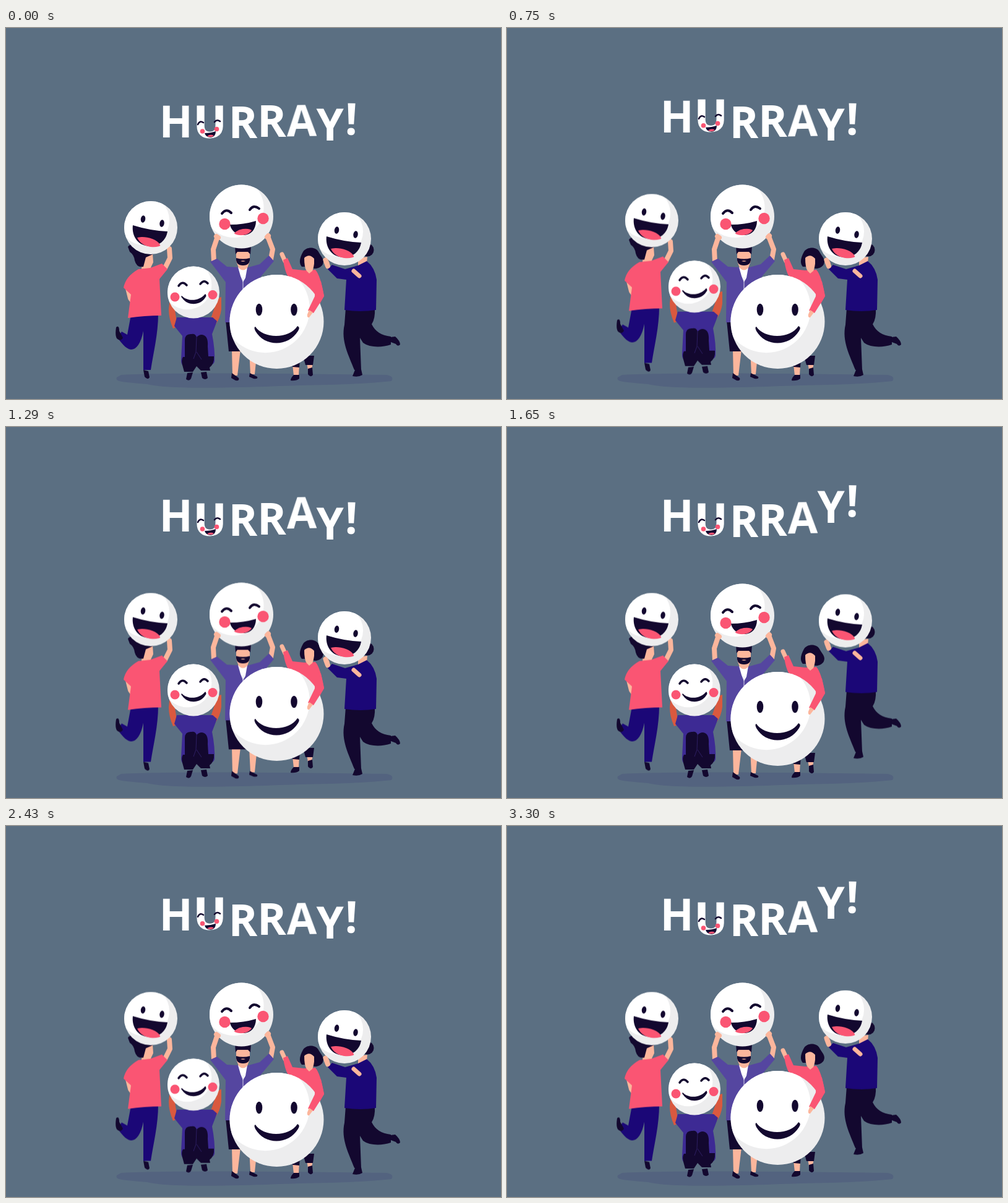
Animation of 800 by 600 pixels, one loop 3.33 s. Source, as an HTML page without scripts:

```html
<!DOCTYPE html>
<html lang="en">
<head>
<meta charset="utf-8">
<title>Hurray!</title>
<style>
html, body { margin: 0; width: 100%; height: 100%; overflow: hidden; background: #5b6f82; }
svg { display: block; width: 800px; height: 600px; }
text { font: 700 71px "Open Sans", "Noto Sans", sans-serif; fill: #fff; }

.ink { fill: #13082f; }
.skin { fill: #fcb69c; }
.pink { fill: #fa5573; }
.navy { fill: #1b0777; }
.violet { fill: #5546a0; }
.indigo { fill: #3d2a94; }
.tan { fill: #d9593f; }
.limb { fill: none; stroke: #fcb69c; stroke-width: 8; stroke-linecap: round; stroke-linejoin: round; }
.brow { fill: none; stroke: #13082f; stroke-width: 4; stroke-linecap: round; }

/* The wave runs every 1680 ms; the second run is cut short at 3330 ms. */
.j1, .j2, .j3, .j4, .j5 { animation: 3330ms linear infinite; }
.j1 { animation-name: jump1; }
.j2 { animation-name: jump2; }
.j3 { animation-name: jump3; }
.j4 { animation-name: jump4; }
.j5 { animation-name: jump5; }
@keyframes jump1 {
  0%, 3.6%, 50.45%, 54.05% { transform: translateY(0); }
  9.37%, 59.82% { transform: translateY(-29px); }
  13.21%, 50.44%, 63.66%, 100% { transform: translateY(var(--end)); }
}
@keyframes jump2 {
  0%, 14.92%, 50.45%, 65.37% { transform: translateY(0); }
  19.64%, 70.09% { transform: translateY(-24px); }
  23.99%, 50.44%, 74.44%, 100% { transform: translateY(-2px); }
}
@keyframes jump3 {
  0%, 26.49%, 39.1%, 76.94%, 89.55%, 100% { transform: translateY(0); }
  32.79%, 83.24% { transform: translateY(-32px); }
}
@keyframes jump4 {
  0%, 32.43%, 50.45%, 82.88% { transform: translateY(0); }
  36.7%, 87.15% { transform: translateY(-21.6px); }
  40.36%, 50.44%, 90.81%, 100% { transform: translateY(-3px); }
}
@keyframes jump5 {
  0%, 42.34%, 50.45%, 92.79% { transform: translateY(0); }
  48.65%, 99.1% { transform: translateY(-32.3px); }
  50.44% { transform: translateY(-23px); }
  100% { transform: translateY(-27.7px); }
}
</style>
</head>
<body>
<svg viewBox="0 0 800 600">
  <defs>
    <clipPath id="disc"><circle r="50"/></clipPath>
    <g id="ball">
      <circle r="50" fill="#ededee"/>
      <circle cx="-12" cy="-14" r="47" fill="#fff" clip-path="url(#disc)"/>
    </g>
    <path id="grin" d="M205 319Q234 328 261 329C258 347 243 355 226 352C211 349 203 334 205 319Z"/>
    <clipPath id="grinClip"><use href="#grin"/></clipPath>
    <g id="laughing">
      <use href="#ball" transform="translate(234 323) scale(.86)"/>
      <g class="ink">
        <ellipse cx="221.500" cy="309" rx="3.700" ry="5.800" transform="rotate(10 221.500 309)"/>
        <ellipse cx="252" cy="316" rx="3.700" ry="5.800" transform="rotate(10 252 316)"/>
        <use href="#grin"/>
      </g>
      <ellipse class="pink" cx="226" cy="351" rx="24" ry="12.500" transform="rotate(10 226 351)" clip-path="url(#grinClip)"/>
    </g>
    <path id="laugh" d="M362 318Q384 318 404 312C404 326 396 334 385 335C374 335 364 329 362 318Z"/>
    <clipPath id="laughClip"><use href="#laugh"/></clipPath>
  </defs>

  <rect width="800" height="600" fill="#5b6f82"/>
  <path fill="#53637f" d="M186 561C300 556 500 560 615 561Q628 563 623 571C560 578 480 577 420 580C340 582 260 584 228 576C190 572 176 573 179 565Z"/>

  <!-- Lettering -->
  <g class="j1" style="--end:-8px"><text x="247.500" y="177">H</text></g>
  <g class="j2">
    <text x="303.500" y="176.500" stroke="#fff" stroke-width="1.800" style="font-size:69px">U</text>
    <path class="brow" style="stroke-width:2.500" d="M310 156Q313 149 319 153M337 152Q341 147 346 151"/>
    <circle class="pink" cx="317.500" cy="167" r="3.800"/>
    <circle class="pink" cx="340.500" cy="163.500" r="3.800"/>
    <path class="ink" d="M321 170Q331 170 339 167Q339 176 331 177Q323 177 321 170Z"/>
    <path class="pink" d="M325 175Q330 171 336 174Q332 178 325 175Z"/>
  </g>
  <g class="j3"><text x="359.500" y="177.500">R</text><text x="406" y="175.500">R</text></g>
  <g class="j4"><text x="454" y="174.500" style="font-size:70px" transform="rotate(-1 478 175)">A</text></g>
  <g class="j5">
    <text x="501.500" y="182">Y</text>
    <text x="548" y="172.500" transform="rotate(1 558 148)">!</text>
  </g>

  <!-- Runner on the left -->
  <g class="j1" style="--end:-11.500px">
    <path class="skin" d="M220 365H237L238 379Q235 385 232 392L219 391Z"/>
    <path class="ink" d="M197 354C201 348 210 351 213 354L239 357Q240 366 235 367L226 371L222 386Q211 388 208 376Q207 367 200 362Z"/>
    <path class="limb" d="M264 357L265 372L257 388"/>
    <path class="limb" d="M197 421L201 437L210 449"/>
    <path class="navy" d="M202 464L246 462C246 495 238 526 234 553L222 553L222 490C218 510 211 520 202 520C193 519 186 508 180 501L187 491L196 496Z"/>
    <path class="pink" d="M214 390L233 388L252 381L261 390L248 406L251 465Q224 465 197 469L202 431L190 420Q193 402 214 390Z"/>
    <path class="ink" d="M178 484Q183 480 183 490L189 501Q185 508 179 502Q176 497 178 484ZM222 553L230 555L232 565Q229 570 224 564Z"/>
    <use href="#laughing"/>
  </g>

  <!-- Man with raised arms -->
  <g class="j3">
    <path class="limb" d="M342 337L335 358L336 378M423 337L431 358L428 374"/>
    <path class="skin" d="M365 520H379L374 562H366ZM393 520H406L402 560H395Z"/>
    <path class="ink" d="M355 473H411L405 523H360ZM365 558L376 566Q378 571 371 570L364 566ZM394 558L406 564Q408 568 400 567L393 564Z"/>
    <path class="violet" d="M330 378L341 373L357 386L375 387H392L410 382L425 368L433 377L411 403V476H354L355 411Z"/>
    <path fill="#fff" d="M375 387L390 387L387 404L383 411L379 401Z"/>
    <path fill="none" stroke="#dcd9ed" d="M383 403V474"/>
    <path class="skin" d="M372 358H394V377L390 388Q383 395 376 388L372 377Z"/>
    <path class="ink" d="M370 353H396L395 366L391 362H374L371 366ZM372 372Q383 375 394 372Q395 384 383 384Q371 384 372 372Z"/>
    <path class="skin" d="M379 377Q383 375.500 387 377Q383 378.500 379 377Z"/>
    <use href="#ball" transform="translate(380.500 305) scale(1.030)"/>
    <path class="brow" d="M349 300Q356 291 364 299M394 294Q400 285 409 292"/>
    <circle class="pink" cx="353.500" cy="317" r="9.200"/>
    <circle class="pink" cx="415.500" cy="308" r="9.200"/>
    <use href="#laugh" class="ink"/>
    <ellipse class="pink" cx="384" cy="333" rx="16" ry="8" transform="rotate(-9 384 333)" clip-path="url(#laughClip)"/>
    <path class="limb" d="M340 337L343 339M422 338L424 336"/>
  </g>

  <!-- Crouching figure -->
  <g class="j2">
    <path class="tan" d="M265 436L272 449L277 483L270 486Q263 470 263 455ZM342 437L348 435V455Q346 470 339 479L331 470Z"/>
    <path class="indigo" d="M276 468H334L341 474L333 495Q338 520 337 540Q334 547 322 546H292Q282 548 283 536L285 498L272 482Z"/>
    <path class="ink" d="M289 505Q289 494 300 495Q306 494 308 500Q314 494 320 497Q327 500 326 515L327 531H336Q337 543 329 549L330 554H315L308 547L302 556H288L285 545Q283 537 286 532L289 532Z"/>
    <path fill="none" stroke="#2d1f63" d="M308 500L307 524L303 535M308 524L316 536"/>
    <path class="ink" d="M293 558L302 557L299 567Q296 572 291 568ZM315 557L324 556L326 566Q322 570 317 566Z"/>
    <use href="#ball" transform="translate(303 427.500) scale(.840)"/>
    <path class="brow" style="stroke-width:3.500" d="M279 417Q285 408 292 416M314 414Q320 406 326 413"/>
    <circle class="pink" cx="273" cy="435" r="7.500"/>
    <circle class="pink" cx="334" cy="431.500" r="7.500"/>
    <path class="ink" d="M284 433C293 443 313 442 322 430Q325 433 322 436C314 449 294 450 285 437Q282 434 284 433Z"/>
  </g>

  <!-- Woman with the large ball -->
  <g class="j4">
    <path class="limb" style="stroke-width:7" d="M446 366L451 377"/>
    <path class="skin" d="M463 544H474L473 562H465ZM486 540H496L494 553H488Z"/>
    <path class="ink" d="M460 536H475L474 549L463 548ZM480 530H498L496 545H484Z"/>
    <path class="ink" d="M465 561H474V567Q469 571 460 570Q460 566 465 561ZM488 551L495 549L496 561Q492 566 488 560Z"/>
    <path class="pink" d="M448 375L455 372L463 390L482 392L500 391Q508 400 514 433L497 465L488 460L499 435V490H460L461 409Q451 399 448 375Z"/>
    <path class="ink" d="M480 362C486 353 501 354 505 362C510 371 515 374 512 382C508 390 496 391 491 386L478 386Q471 378 480 362Z"/>
    <path class="skin" d="M482 372Q490 364 498 373V381Q497 389 495 393L490 397L486 393Q482 388 482 372Z"/>
    <use href="#ball" transform="translate(437.500 475) scale(1.520)"/>
    <g class="ink">
      <ellipse cx="409" cy="455.500" rx="5.300" ry="9.800"/>
      <ellipse cx="465.500" cy="455.500" rx="5.300" ry="9.800"/>
      <path d="M403 483C416 503 458 503 471 482Q476 484 472 490C456 516 418 516 403 490Q400 484 403 483Z"/>
    </g>
    <path class="pink" d="M500 400L509 410L514 434L497 461L488 457L499 434Z"/>
    <path class="skin" d="M490 456L496 460L490 468Q486 469 487 463Z"/>
  </g>

  <!-- Runner on the right -->
  <g class="j5">
    <circle class="ink" cx="584" cy="359" r="10.500"/>
    <path class="skin" d="M569 372L584 370L582 390H569Z"/>
    <path class="ink" d="M549 453H596Q597 470 591 479C597 491 606 497 622 499L622 512C607 517 588 517 577 509L572 501L574 553H563C554 530 541 506 547 480Z"/>
    <path class="ink" d="M621 500L629 499Q637 506 637 512Q633 516 630 511L622 508ZM564 553L574 552L576 561Q570 565 560 563Z"/>
    <path class="navy" d="M520 390L527 383L548 390L569 384L583 377Q596 387 599 407L598 456Q573 460 547 456L550 407L535 405Z"/>
    <path class="limb" d="M517 377L520 385"/>
    <path class="limb" style="stroke-width:7" d="M562 393L571 401"/>
    <use href="#laughing" x="313" y="18"/>
    <path class="limb" style="stroke-width:7" d="M516 375L519 380"/>
  </g>
</svg>
</body>
</html>
```
